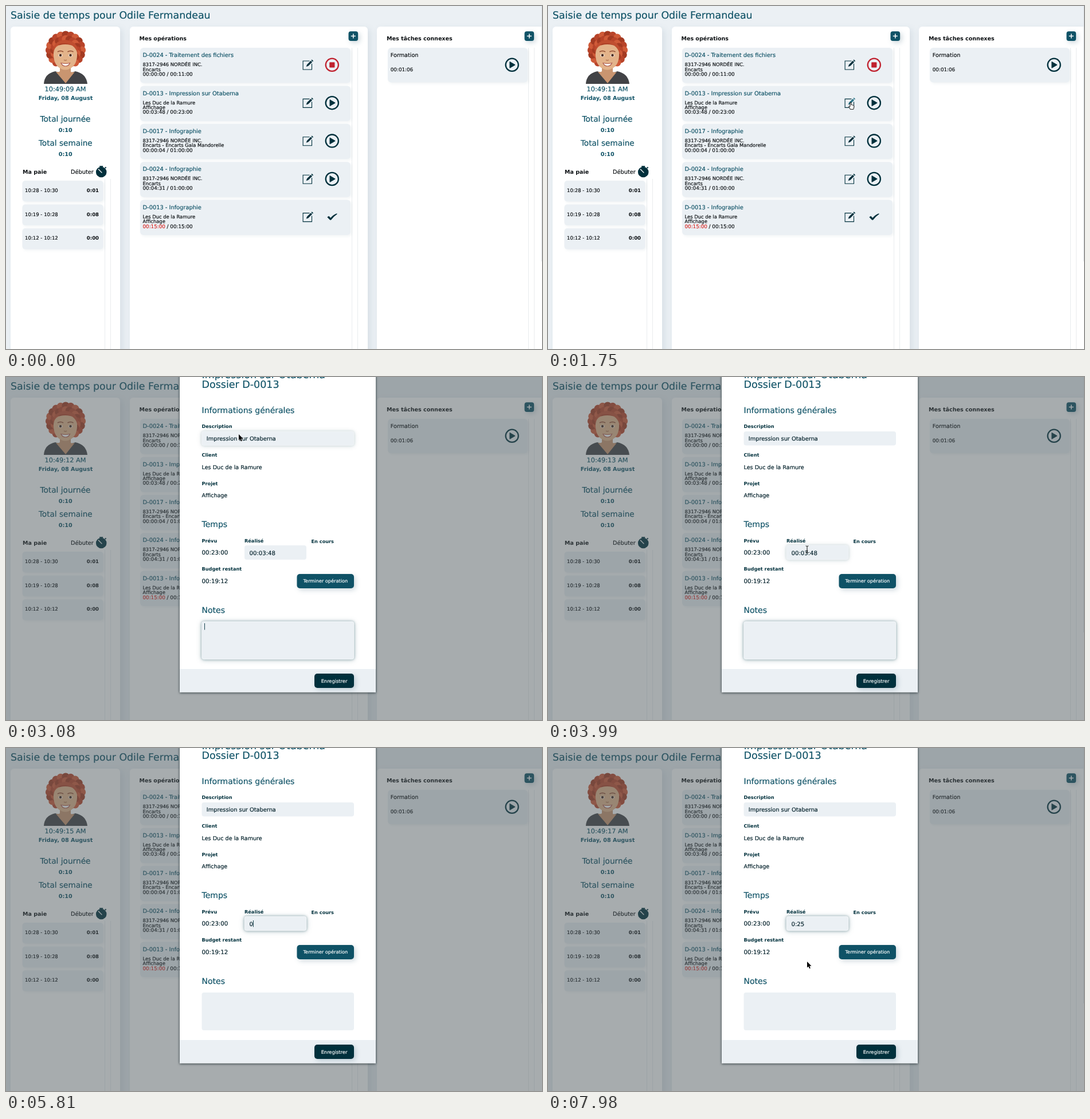
Write an HTML page that moves like this. It is 935x599 px and loops after 8 s.

```html
<!DOCTYPE html>
<html lang="fr">
<head>
<meta charset="utf-8">
<title>Saisie de temps</title>
<style>
  html, body { margin: 0; width: 100%; height: 100%; overflow: hidden; background: #ebf0f4; }
  svg { display: block; width: 935px; height: 599px; }
  text { font-family: "DejaVu Sans", Verdana, sans-serif; white-space: pre; text-rendering: geometricPrecision; stroke-width: .18px; }
  .panel { fill: #fff; filter: drop-shadow(4px 4px 6px rgba(10, 60, 85, .09)); }
  .card { fill: #ebf0f4; filter: drop-shadow(2px 2px 2px rgba(10, 60, 85, .06)); }
  .button { filter: drop-shadow(3px 3px 4px rgba(10, 60, 85, .2)); }
  .modal { fill: #fff; filter: drop-shadow(0 1px 2px rgba(0, 15, 20, .75)); }
  .glow { fill: #ebf0f4; stroke: #fff; stroke-width: .6; filter: drop-shadow(0 0 2px rgba(10, 65, 80, .4)) drop-shadow(0 1px 4px rgba(10, 65, 80, .25)); }
</style>
</head>
<body>
<svg id="stage" viewBox="0 0 935 599"></svg>
<script>
const TEAL = '#0f5266', DARK = '#00303c', INK = '#0b0f12', VALUE = '#03202a', RED = '#c0222f', FIELD = '#ebf0f4';
const stage = document.getElementById('stage');
const $ = id => document.getElementById(id);

const text = (x, y, str, size, fill = INK, extra = '') =>
  `<text x="${x}" y="${y}" font-size="${size}" fill="${fill}" stroke="${fill}" ${extra}>${str}</text>`;
const bold = (x, y, str, size, fill = INK, extra = '') =>
  text(x, y, str, size, fill, `font-weight="700" style="stroke:none" ${extra}`);
const MID = 'text-anchor="middle"', END = 'text-anchor="end"';
const rect = (x, y, w, h, r, extra) =>
  `<rect x="${x}" y="${y}" width="${w}" height="${h}" rx="${r}" ${extra}/>`;
const path = (d, extra) => `<path d="${d}" ${extra}/>`;
const at = (x, y, body) => `<g transform="translate(${x} ${y})">${body}</g>`;

// Icons, each drawn around its own centre
const play = `<circle r="11.1" fill="none" stroke="${DARK}" stroke-width="2.3"/>` +
  path('M-3.8-5.4 5.4 0-3.8 5.4Z', `fill="${DARK}" stroke="${DARK}" stroke-linejoin="round"`);
const stop = `<circle r="11.1" fill="none" stroke="${RED}" stroke-width="2.3"/>` +
  rect(-4.6, -4.6, 9.2, 9.2, 1, `fill="${RED}"`);
const check = path('M-8.5.3-5.6-1.6-2.6 1.5Q2-4 8.5-6.2L8.8-5Q2-.5-1.8 5.4H-3.6Z', `fill="${DARK}"`);
const edit = (id = '') =>
  path('M3-6.8H-8.4V8.2H7V-2', `fill="none" stroke="${DARK}" stroke-width="1.1"`) +
  path('M-2.8 3.2-1.6-.4 5.2-7.2 7.6-4.8.8 2Z M6-8 7.2-9.2 9.6-6.8 8.4-5.6Z', `${id} fill="${DARK}"`);
const plus = rect(-8.3, -8.3, 16.6, 16.6, 4, `fill="${TEAL}" class="button"`) +
  path('M-4 0H4M0-4V4', 'stroke="#fff" stroke-width="1.5"');
const stopwatch = `<circle r="9.3" fill="${DARK}"/>` +
  path('M-3-9.8H3M0-9V-10M6.5-7 8.4-8.6', `stroke="${DARK}" stroke-width="2"`) +
  path('M-5.2-5.2 1.2 1.4', 'stroke="#fff" stroke-width="1.3"');

function avatar() {
  let curls = '';
  for (let i = 0; i < 34; i++) {
    const a = Math.PI * (.7 + 1.6 * (i % 17) / 16), k = i < 17 ? 1 : .72;
    const x = 104 + 28.5 * k * Math.cos(a), y = 77 + 27 * k * Math.sin(a);
    curls += `<circle cx="${x.toFixed(1)}" cy="${y.toFixed(1)}" r="6.6" fill="${['#b8442a', '#cf5a38', '#a33a22'][i % 3]}"/>`;
  }
  const eye = x => `<ellipse cx="${x}" cy="86" rx="3.2" ry="2.6" fill="#fff"/><circle cx="${x}" cy="86" r="2.3" fill="#4d2d1d"/>` +
    path(`M${x - 5} 80q5-3 10 0`, 'fill="none" stroke="#8f4a30" stroke-width="1.5"');
  return `<ellipse cx="104" cy="79" rx="32" ry="29" fill="#ad4127"/>` + curls +
    path('M66 136Q67 118 86 114L103.5 120 121 114Q140 118 142 136Z', 'fill="#424346"') +
    path('M94 104H113V115Q118 116 120 115L104 135 87 115Q92 116 94 114Z', 'fill="#c99570"') +
    path('M83 82Q84 67 103.5 67 123 67 124 82 125 100 114 108 103.5 115 93 108 82 100 83 82Z', 'fill="#e3b38a"') +
    path('M82 83Q84 67 99 65 119 64 125 83 128 63 104 59 80 61 82 83Z', 'fill="#c04e30"') +
    eye(95) + eye(112.5) +
    path('M101 94q2.5 2 5 0', 'fill="none" stroke="#b57b57" stroke-width="1.4"') +
    path('M96 99.5q8 2 15.5 0-2 5.5-7.7 5.5T96 99.5Z', 'fill="#fff" stroke="#ad5a4c" stroke-width="1.2"');
}

const FIRM = '8317-2946 NORDÉE INC.', CLIENT = 'Les Duc de la Ramure', JOB = 'Impression sur Otaberna';
const operations = [
  ['D-0024 - Traitement des fichiers', FIRM, 'Encarts', '00:00:00', '00:11:00', stop],
  ['D-0013 - ' + JOB, CLIENT, 'Affichage', '00:03:48', '00:23:00', play],
  ['D-0017 - Infographie', FIRM, 'Encarts - Encarts Gala Mandorelle', '00:00:04', '01:00:00', play],
  ['D-0024 - Infographie', FIRM, 'Encarts', '00:04:31', '01:00:00', play],
  ['D-0013 - Infographie', CLIENT, 'Affichage', '00:15:00', '00:15:00', check]
];
const operation = ([name, client, project, done, planned, icon], i) => {
  const tint = i == 4 ? '#d8231f' : INK;
  return at(0, 66.4 * i,
    rect(234, 73, 367, 61.5, 6, 'class="card"') +
    text(238.5, 89.3, name, 9.85, TEAL) +
    text(238.5, 105.2, client, 8.4) +
    text(238.5, 113.7, project, 8.4) +
    text(238.5, 122, `<tspan fill="${tint}" stroke="${tint}">${done}</tspan> / ${planned}`, 8.75) +
    at(526.5, 102.8, edit(i == 1 ? 'id="pencil"' : '')) + at(568.8, 102.8, icon));
};

const shift = ([span, total], i) => at(0, 41.6 * i,
  rect(28.5, 305, 141, 36.5, 5, 'class="card"') +
  text(33, 325.2, span, 8.55) + bold(162, 325.2, total, 8.5, INK, END));

const tracks = (x, y) => path(`M${x} ${y}V599M${x + 10} ${y}V599`, 'stroke="#e9ecee" stroke-width="1"');

const page =
  text(8, 22, 'Saisie de temps pour Odile Fermandeau', 17.4, TEAL) +
  rect(8, 36, 191, 600, 6, 'class="panel"') +
  rect(216, 36, 415, 600, 6, 'class="panel"') +
  rect(647, 36, 300, 600, 6, 'class="panel"') +
  path('M934.5 0V446', 'stroke="#dfe4e8"') +
  avatar() +
  text(67.6, 149, '', 11.3, TEAL, 'id="clock"') +
  bold(104, 164, 'Friday, 08 August', 9.6, TEAL, MID) +
  text(103.5, 202, 'Total journée', 13.7, TEAL, MID) +
  bold(103.7, 220.4, '0:10', 9.6, TEAL, MID) +
  text(103.8, 243.6, 'Total semaine', 13.6, TEAL, MID) +
  bold(103.7, 262, '0:10', 9.6, TEAL, MID) +
  bold(29, 292.7, 'Ma paie', 9.5) +
  text(113, 292.7, 'Débuter', 9.8) +
  at(166.2, 290, stopwatch) +
  tracks(172.5, 302) +
  [['10:28 - 10:30', '0:01'], ['10:19 - 10:28', '0:08'], ['10:12 - 10:12', '0:00']].map(shift).join('') +
  bold(232.5, 60, 'Mes opérations', 9.5) +
  tracks(603.5, 73) + at(605.8, 52.6, plus) +
  operations.map(operation).join('') +
  bold(664, 60, 'Mes tâches connexes', 9.57) +
  tracks(911.5, 73) + at(912.8, 52.6, plus) +
  rect(666, 73, 244, 60.5, 6, 'class="card"') +
  text(670.8, 89.3, 'Formation', 9.65) +
  text(670.8, 113.7, '00:01:06', 8.75) +
  at(882.7, 102.8, play);

const label = (x, y, str) => bold(x, y, str, 8.2, DARK);
const field = (id, x, y, w, h) => rect(x, y, w, h, 4, `fill="${FIELD}"`) +
  rect(x, y, w, h, 4, `class="glow" id="${id}" opacity="0"`);

const modal =
  rect(303, -20, 342, 570.5, 0, 'class="modal"') +
  rect(303, 510, 342, 40.5, 0, `fill="${FIELD}"`) +
  text(341.5, 1.6, JOB, 17.45, TEAL) +
  text(341.5, 18.8, 'Dossier D-0013', 17.5, TEAL) +
  text(341.5, 63, 'Informations générales', 14, TEAL) +
  label(341.5, 89.3, 'Description') +
  field('descGlow', 341.5, 95, 265.5, 24.5) +
  text(349.8, 110.8, JOB, 9.8, VALUE) +
  label(341.5, 139.2, 'Client') +
  text(341.5, 160.5, CLIENT, 9.65, VALUE) +
  label(341.5, 189, 'Projet') +
  text(341.5, 210.3, 'Affichage', 9.5, VALUE) +
  text(341.5, 262.2, 'Temps', 14, TEAL) +
  label(341.5, 288.6, 'Prévu') + label(416, 288.6, 'Réalisé') + label(532.5, 290, 'En cours') +
  text(341.5, 310.3, '00:23:00', 10.2, VALUE) +
  field('doneGlow', 416, 294, 108, 25) +
  rect(424, 300, 45, 16.5, 0, 'id="selection" fill="#b3d4f5"') +
  text(424.5, 310.5, '', 10.15, VALUE, 'id="done"') +
  label(341.5, 338.4, 'Budget restant') +
  text(341.5, 360, '00:19:12', 10.2, VALUE) +
  rect(507.5, 344, 99.5, 25, 5, `fill="${TEAL}" class="button"`) +
  text(557.3, 359.3, 'Terminer opération', 8.2, '#fff', MID) +
  text(341.5, 411.5, 'Notes', 14, TEAL) +
  field('notesGlow', 341.5, 427, 265.5, 66) +
  rect(538, 518, 69, 25, 5, `fill="${DARK}" class="button"`) +
  text(572.5, 533.5, 'Enregistrer', 8.3, '#fff', MID) +
  rect(0, 0, .9, 11.5, 0, `fill="${DARK}" id="caret"`);

const cursors =
  path('M0 0V10.6L2.4 8.4 4.1 12.2 5.8 11.5 4.2 7.8H7.5Z',
    'id="arrow" stroke="#fff" stroke-width=".7" paint-order="stroke"') +
  path('M-1 .8Q0-.6 1 .8V4.6Q2.3 4 2.8 5 4 4.6 4.4 5.6 5.8 5.2 5.9 6.6 6 9 4.8 12.4H-.8Q-1.6 9.8-3.4 7.8-3.6 6.2-1 7.6Z',
    'id="hand" fill="#fff" stroke="#000" stroke-width=".9" stroke-linejoin="round"') +
  path('M-2.4-6Q0-6 0-4.6V4.6Q0 6-2.4 6M2.4-6Q0-6 0-4.6M0 4.6Q0 6 2.4 6M-1.4 2.2H1.4',
    'id="beam" fill="none" stroke="#111" stroke-width="1"');

stage.innerHTML = page +
  `<g id="dialog">${rect(0, 0, 935, 599, 0, 'fill="rgba(76,86,91,.49)"')}${modal}</g>` +
  `<g id="pointer">${cursors}</g>`;

// Pointer path: time, x, y
const route = [[0, 566, 640], [70, 560, 592], [450, 545, 300], [840, 528, 168], [2500, 528, 168],
  [2730, 500, 122], [2920, 496, 118], [3080, 406, 100], [3300, 394, 105], [3780, 440, 296],
  [4200, 464, 306], [5810, 464, 306], [7490, 454, 306], [7770, 449, 383], [7980, 452, 373]];
const ticks = [350, 1330, 2310, 3360, 4340, 5530, 6580, 7560];
const typed = [[0, '00:03:48'], [4830, ''], [5810, '0'], [6300, '0:'], [6790, '0:2'], [7000, '0:25']];

const between = (t, a, b) => t >= a && t < b;
const ramp = (t, start) => Math.min(1, Math.max(0, (t - start) / 140));
const show = (id, on) => $(id).setAttribute('visibility', on ? 'inherit' : 'hidden');

function position(t) {
  const i = Math.max(1, route.findIndex(p => p[0] >= t));
  const [t0, x0, y0] = route[i - 1], [t1, x1, y1] = route[i];
  let k = (t - t0) / (t1 - t0);
  k = k * k * (3 - 2 * k);
  return [x0 + (x1 - x0) * k, y0 + (y1 - y0) * k];
}

function draw(time) {
  const t = Math.floor(time / 70) * 70;
  const open = t >= 1960;
  const seconds = 9 + ticks.filter(s => s <= t).length;
  $('clock').textContent = `10:49:${String(seconds).padStart(2, '0')} AM`;
  $('dialog').setAttribute('visibility', open ? 'visible' : 'hidden');
  $('pencil').setAttribute('fill', between(t, 840, 1960) ? '#2b7387' : DARK);

  $('descGlow').setAttribute('opacity', .5 * (ramp(t, 2660) - ramp(t, 3360)));
  $('doneGlow').setAttribute('opacity', .5 * ramp(t, 3710) + .5 * ramp(t, 4270));
  $('notesGlow').setAttribute('opacity', 1 - ramp(t, 4270));

  const value = typed.filter(v => v[0] <= t).pop()[1];
  $('done').textContent = value;
  show('selection', between(t, 4550, 4830));

  const inNotes = t < 4340;
  const lit = inNotes ? (t - 1960) % 1060 < 540 : between(t, 5390, 7490);
  const caretX = inNotes ? 346 : 424.3 + (value ? $('done').getComputedTextLength() + .3 : 0);
  $('caret').setAttribute('x', caretX);
  $('caret').setAttribute('y', inNotes ? 430 : 301);
  show('caret', open && lit);

  const [x, y] = position(t);
  const hand = between(t, 910, 1960);
  const beam = t >= 3780 && y > 294 && y < 319;
  $('pointer').setAttribute('transform', `translate(${x.toFixed(1)} ${y.toFixed(1)})`);
  $('pointer').setAttribute('visibility', between(t, 5810, 7490) ? 'hidden' : 'visible');
  show('hand', hand);
  show('beam', beam);
  show('arrow', !hand && !beam);
}

function loop() {
  draw(performance.now() % 8000);
  requestAnimationFrame(loop);
}
loop();
</script>
</body>
</html>
```
